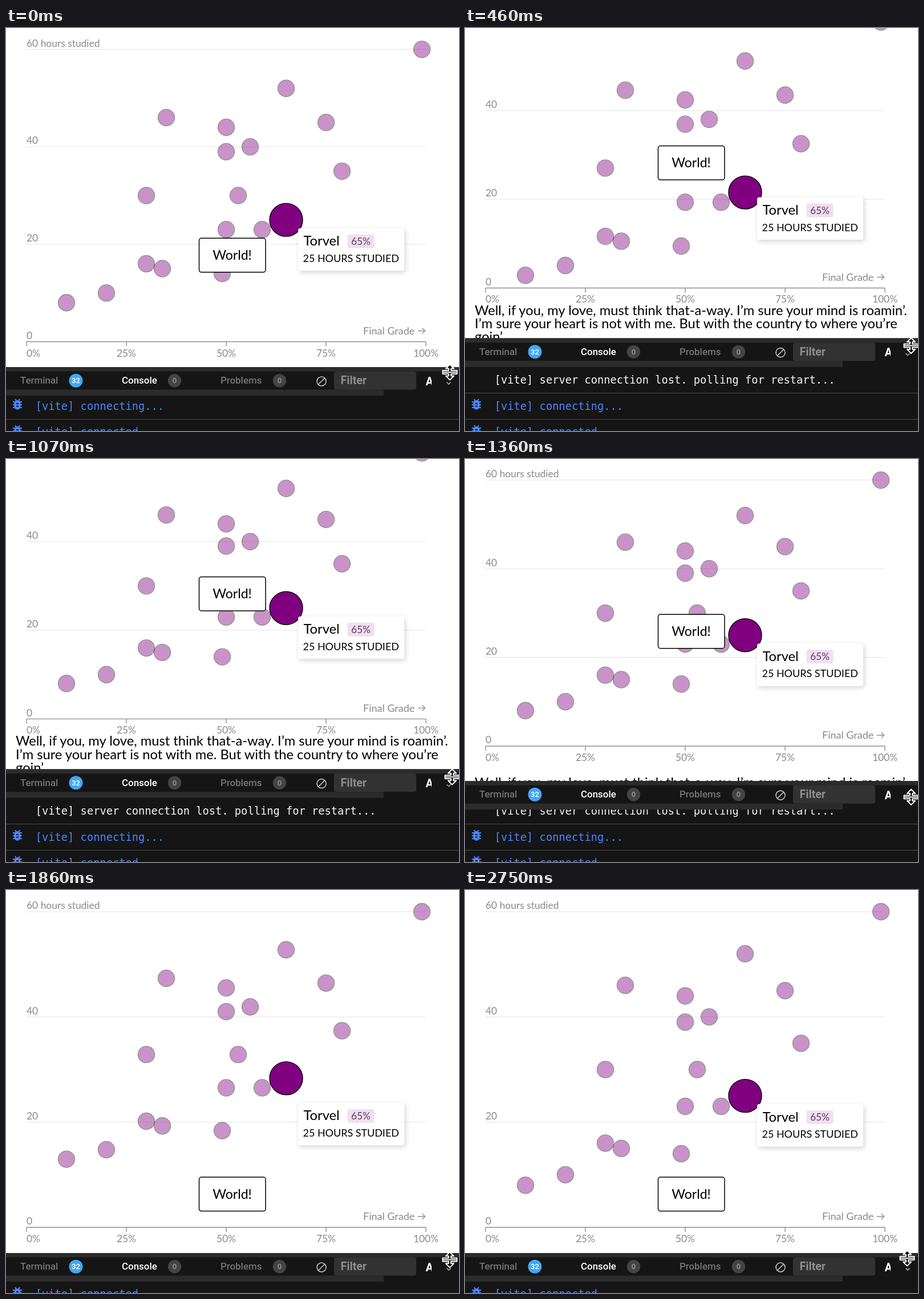
Write an HTML page that moves like this. It is 794x706 px and loops after 3530 ms.

```html
<!DOCTYPE html>
<html lang="en">
<head>
<meta charset="utf-8">
<title>Resizable scatter plot</title>
<style>
  html, body { margin: 0; width: 100%; height: 100%; overflow: hidden; background: #fff; }
  svg { display: block; width: 794px; height: 706px; font-family: Lato, sans-serif; }
  .grid { stroke: #e4e4e8; }
  .axis { stroke: #8e8e96; stroke-width: 1.4; fill: none; }
  .label { fill: #888890; font-size: 17.4px; }
  .dot { fill: purple; stroke: #000; stroke-width: 1.4; opacity: .42; }
  .dot.on { opacity: 1; }
  .card { fill: #fff; filter: drop-shadow(2px 3px 4px rgba(0, 0, 0, .17)); }
  .verse { font-size: 23.7px; }
  .log { font: 18.72px "DejaVu Sans Mono", monospace; fill: #4a86ff; }
  .tab { font: 500 16.9px Roboto, sans-serif; fill: #757575; }
  .badge { font: 500 13px Roboto, sans-serif; text-anchor: middle; }
</style>
</head>
<body>
<svg viewBox="0 0 794 706">
  <defs>
    <clipPath id="cut"><rect x="730" y="0" width="16" height="60"/></clipPath>
    <clipPath id="below"><rect id="logArea" width="794" height="706"/></clipPath>
    <g id="bug" fill="#4a86ff">
      <path d="M-8-4H8M-8 1H8M-8 6H8M-4-9-2-6M4-9 2-6" stroke="#4a86ff" stroke-width="2"/>
      <rect x="-5.5" y="-7" width="11" height="16.5" rx="5.5"/>
      <path d="M-2-1H2M-2 3.5H2" stroke="#151515" stroke-width="2"/>
    </g>
  </defs>

  <g id="chart"></g>
  <g id="verse" class="verse">
    <text x="17">Well, if you, my love, must think that-a-way. I’m sure your mind is roamin’.</text>
    <text x="17" y="23.3">I’m sure your heart is not with me. But with the country to where you’re</text>
    <text x="17" y="46.6">goin’</text>
  </g>
  <g id="tip">
    <rect class="card" x="512" y="14.5" width="186" height="74.5" rx="4"/>
    <text x="521.5" y="45.2" font-size="23.7">Torvel</text>
    <rect x="598.5" y="25.5" width="47" height="24" rx="4" fill="#f1dff1"/>
    <text x="622" y="43.7" font-size="17.4" fill="#5b3d5b" text-anchor="middle">65%</text>
    <text x="520.5" y="73.7" font-size="17.95">25 HOURS STUDIED</text>
  </g>
  <g id="box">
    <rect x="338.5" y="-59.5" width="116.5" height="59.5" rx="4" fill="#fff" stroke="#000" stroke-width="1.5"/>
    <text x="396.5" y="-22" font-size="23" text-anchor="middle">World!</text>
  </g>

  <rect id="body" width="794" height="706" fill="#151515"/>
  <g class="log" clip-path="url(#below)">
    <path d="M0 639.5H794M0 685.5H794" stroke="#4b4b4b"/>
    <text x="51.8" y="623" fill="#f4f4f4">[vite] server connection lost. polling for restart...</text>
    <text x="51.8" y="668.5">[vite] connecting...</text>
    <text x="51.8" y="714">[vite] connected.</text>
    <use href="#bug" x="20" y="659"/>
    <use href="#bug" x="20" y="705"/>
  </g>
  <g id="bar">
    <rect width="794" height="50" fill="#151515"/>
    <rect width="794" height="7.5" fill="#2b2b2b"/>
    <rect y="39.5" width="662" height="10.5" fill="#2b2b2b"/>
    <text class="tab" x="25" y="29.2">Terminal</text>
    <text class="tab" x="203" y="29.2" style="fill:#fff">Console</text>
    <text class="tab" x="376" y="29.2">Problems</text>
    <g class="badge">
      <circle cx="122.5" cy="23.7" r="12" fill="#42a8f3"/>
      <text x="122.5" y="28.3" fill="#fff">32</text>
      <circle cx="295.5" cy="23.7" r="11.7" fill="#444"/>
      <text x="295.5" y="28.3" fill="#9a9a9a">0</text>
      <circle cx="479.5" cy="23.7" r="11.7" fill="#444"/>
      <text x="479.5" y="28.3" fill="#9a9a9a">0</text>
    </g>
    <g fill="none" stroke="#c4c4c4" stroke-width="1.6">
      <circle cx="553" cy="25" r="8"/>
      <path d="M547.5 30.5 558.5 19.5"/>
      <path d="M772.5 26.5 776 30 779.5 26.5" stroke-width="1.3"/>
    </g>
    <rect x="575" y="7.5" width="144" height="32" rx="4" fill="#323232"/>
    <text x="586.5" y="30.2" style="font:700 19.6px Roboto,sans-serif" fill="#8d8d8d">Filter</text>
    <text x="735.5" y="31.5" clip-path="url(#cut)" style="font:700 20px Roboto,sans-serif" fill="#fff">A</text>
  </g>
  <path id="cursor" d="M0-13.5 7-6.5H2V-3H12.5V3H2V6.5H7L0 13.5-7 6.5H-2V3H-12.5V-3H-2V-6.5H-7ZM-12 0H12"
        fill="#000" stroke="#fff" stroke-width="2" stroke-linejoin="round"/>
</svg>

<script>
const LOOP = 3530;
const $ = id => document.getElementById(id);
const points = [[99, 60], [65, 52], [35, 46], [50, 44], [75, 45], [50, 39], [56, 40], [79, 35], [30, 30],
  [53, 30], [50, 23], [59, 23], [30, 16], [34, 15], [49, 14], [20, 10], [10, 8], [65, 25]];
const xOf = pct => 36 + 7 * pct;

function add(parent, tag, attrs, text) {
  const node = document.createElementNS("http://www.w3.org/2000/svg", tag);
  for (const k in attrs) node.setAttribute(k, attrs[k]);
  if (text) node.textContent = text;
  return parent.appendChild(node);
}
const move = (node, y, x = 0) => node.setAttribute("transform", `translate(${x} ${y})`);

const chart = $("chart");
const rows = [60, 40, 20].map(h => {
  const g = add(chart, "g", {});
  add(g, "path", { class: "grid", d: "M36 0H736" });
  add(g, "text", { class: "label", x: 36, y: -4.7 }, h === 60 ? "60 hours studied" : h);
  return { h, g };
});
const axis = add(chart, "g", {});
const ticks = [0, 25, 50, 75, 100];
add(axis, "path", { class: "axis", d: "M36 0H736" + ticks.map(p => `M${xOf(p)} 0v8`).join("") });
add(axis, "text", { class: "label", x: 36, y: -4.7 }, "0");
for (const p of ticks)
  add(axis, "text", { class: "label", x: xOf(p), y: 26, "text-anchor": p ? "middle" : "start" }, p + "%");
add(axis, "text", { class: "label", x: 626, y: -12.7, style: "font-size:18px" }, "Final Grade");
add(axis, "path", { class: "axis", d: "M722-19H734.5M729.5-24 734.5-19 729.5-14" });
const dots = points.map(([p, h], i) => {
  const on = i === points.length - 1;
  return { h, node: add(chart, "circle", { class: on ? "dot on" : "dot", cx: xOf(p), r: on ? 29 : 14.5 }) };
});

const sine = u => (1 - Math.cos(Math.PI * u)) / 2;
const cubicOut = u => 1 - (1 - u) ** 3;
const cubicInOut = u => u < .5 ? 4 * u ** 3 : 1 - 4 * (1 - u) ** 3;
const part = (t, from, to) => Math.min(1, Math.max(0, (t - from) / (to - from)));

// Two moves: a -> b, then b -> c
const travel = (t, [a, b, c], ease, s1, e1, s2, e2) =>
  a + (b - a) * ease(part(t, s1, e1)) + (c - b) * ease(part(t, s2, e2));

function track(t, keys) {
  let value = keys[0][1];
  for (let i = 1; i < keys.length; i++)
    value += (keys[i][1] - keys[i - 1][1]) * part(t, keys[i - 1][0], keys[i][0]);
  return value;
}

const heights = [512, 466, 553];
const cursorX = [[0, 778], [320, 782], [1360, 782], [1640, 780], [2150, 775]];
const cursorY = [[0, 603], [40, 603], [320, 564], [470, 556], [710, 557], [1240, 557], [1360, 592],
  [1560, 650], [1640, 650], [2150, 645]];

function draw(t) {
  const panel = travel(t, [594, 543.6, 636], sine, 30, 468, 1258, 1588);
  const height = travel(t, heights, sine, 30, 470, 1360, 1610);
  const dotHeight = travel(t, heights, cubicInOut, 428, 978, 1607, 2157);
  const tipHeight = travel(t, heights, cubicOut, 428, 828, 1607, 2007);
  const d = panel - 543.6;
  const scroll = Math.max(0, (17.3 - d) * 2.75);
  const top = 37.5 + (height - 512) / 80 - scroll;
  const yOf = (h, size) => top + (60 - h) / 60 * size;

  rows.forEach(r => move(r.g, yOf(r.h, height)));
  move(axis, yOf(0, height));
  dots.forEach(c => c.node.setAttribute("cy", yOf(c.h, dotHeight)));
  move($("tip"), yOf(25, tipHeight));
  move($("box"), 266 + 3.21 * d);
  move($("verse"), 550 + .7 * d + .025 * d * d - scroll);
  move($("body"), panel);
  move($("bar"), panel);
  $("logArea").setAttribute("y", panel + 50);
  move($("cursor"), track(t, cursorY), track(t, cursorX));
}

const start = performance.now();
function tick(now) {
  draw(Math.max(0, now - start) % LOOP);
  requestAnimationFrame(tick);
}
draw(0);
requestAnimationFrame(tick);
</script>
</body>
</html>
```
